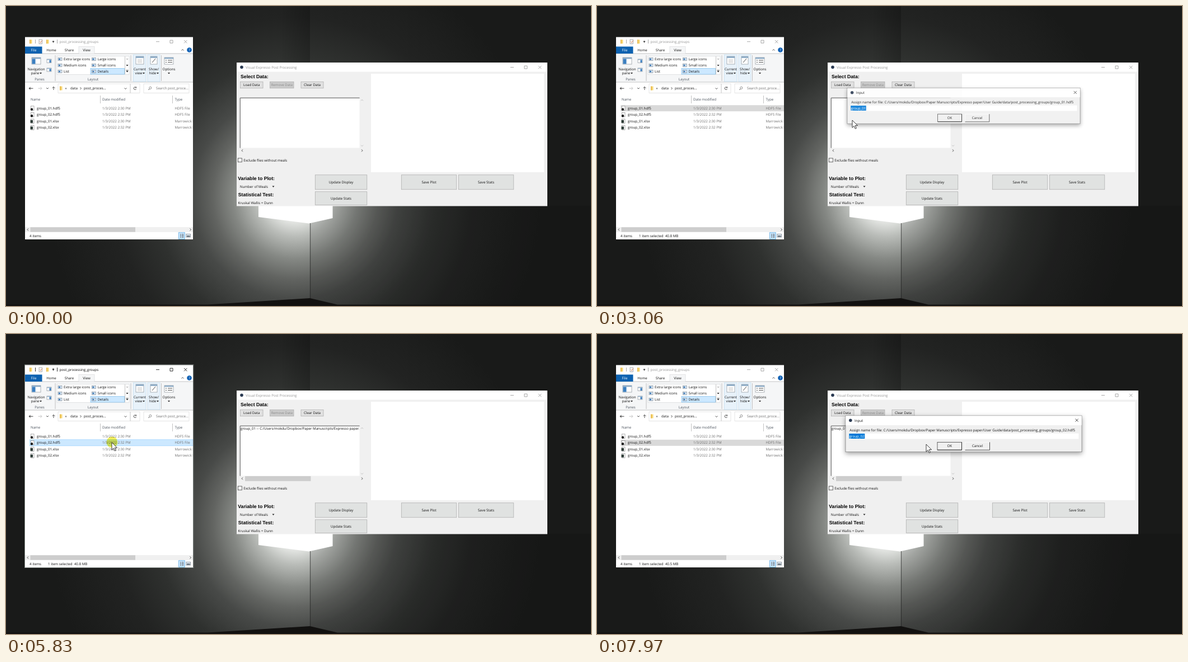
An HTML page that plays this animation: 1045 px wide and 536 px high, repeating every 8000 ms.

```html
<!DOCTYPE html>
<html lang="en">
<head>
<meta charset="utf-8">
<title>Post processing</title>
<style>
  html, body { margin: 0; width: 100%; height: 100%; overflow: hidden; background: #191a19; }
  svg { display: block; width: 100vw; height: 100vh; }
  text { font: 6.2px "Open Sans", "Noto Sans", sans-serif; fill: #111; white-space: pre; text-rendering: geometricPrecision; }
  .mid { text-anchor: middle; }
  .head { font: bold 8.7px "Liberation Sans", Arial, sans-serif; fill: #000; }
  .gray { fill: #6d6d6d; }
  .col { fill: #4a525c; }
  .off { fill: #8a8a8a; }
  .inv { fill: #fff; }
  .ln { fill: none; stroke: #222; stroke-width: .8; }
  .pale { stroke: #b4b4b4; }
  .bar text { fill: #929292; }
  .bar .ln { stroke: #929292; }
  .active > .bar text { fill: #000; }
  .active > .bar .ln { stroke: #000; }
  .edge { opacity: 0; }
  .active > .edge { opacity: 1; }
  #dialog { transform-origin: 655px 178.5px; filter: drop-shadow(0 3px 4px rgba(0,0,0,.38)); }
  .hide { display: none; }
</style>
</head>
<body>
<svg id="stage" viewBox="0 0 1045 536" preserveAspectRatio="none"></svg>
<script>
const T = (x, y, s, c = '') => `<text x="${x}" y="${y}" class="${c}">${s}</text>`;
const R = (x, y, w, h, fill, stroke = 'none') =>
  `<rect x="${x}" y="${y}" width="${w}" height="${h}" fill="${fill}" stroke="${stroke}" stroke-width=".7"/>`;
const P = (d, c = 'ln') => `<path d="${d}" class="${c}"/>`;
const F = (d, fill = '#222') => `<path d="${d}" fill="${fill}"/>`;
const down = (x, y, fill) => F(`M${x - 2} ${y - 1}h4l-2 2.4z`, fill);
const chev = (x, y, dx, dy, c = 'ln') => // small open arrow head
  P(dx ? `M${x - dx} ${y - 2}L${x + dx} ${y}L${x - dx} ${y + 2}` : `M${x - 2} ${y - dy}L${x} ${y + dy}L${x + 2} ${y - dy}`, c);
const folder = (x, y) => R(x - 2, y - 3.5, 4.5, 7, '#f7d877') + R(x - 2, y - 3.5, 1.6, 7, '#e5b548');
const caption = (x, y) => P(`M${x} ${y}h6M${x + 25} ${y - 2.5}h5v5h-5zM${x + 50} ${y - 2.7}l5.4 5.4m0 -5.4l-5.4 5.4`);
const button = (x, y, w, h, s, fill = '#e1e1e1', c = '') =>
  R(x, y, w, h, fill, '#a9a9a9') + T(x + w / 2, y + h / 2 + 2.2, s, 'mid ' + c);

const path = '/Users/mokdu/Dropbox/Paper Manuscripts/Expresso paper/User Guide/data/post_processing_groups/group_0';
const rowTop = i => 177 + i * 11.6;

function room() {
  const stops = [[0, '#fff'], [.1, '#eceeeb'], [.18, '#b9bcb8'], [.28, '#858884'], [.37, '#626461'], [.46, '#484a48'],
    [.62, '#2f312f'], [.8, '#222322'], [1.1, '#191a19']].map(([o, c]) => `<stop offset="${o / 1.1}" stop-color="${c}"/>`).join('');
  return `<radialGradient id="glow" gradientUnits="userSpaceOnUse" cx="517" cy="340" r="440">${stops}</radialGradient>
    <linearGradient id="fold"><stop offset="0" stop-color="#000" stop-opacity="0"/><stop offset="1" stop-color="#000" stop-opacity=".22"/></linearGradient>
    <linearGradient id="ghostFill"><stop offset="0" stop-color="#f4f9fc" stop-opacity=".55"/><stop offset="1" stop-color="#d5eaf5" stop-opacity=".8"/></linearGradient>
    <clipPath id="exClip"><rect x="34" y="55" width="300" height="362"/></clipPath>
    <clipPath id="listClip"><rect x="418.5" y="164" width="212.5" height="89"/></clipPath>` +
    R(0, 0, 1045, 536, 'url(#glow)') + R(490, 0, 53, 101, 'url(#fold)') +
    `<path d="M543 388V523L560 533H1045V357H583V379z" fill="#000" opacity=".13"/>
    <path d="M543.5 388V522" stroke="#1c1d1c" stroke-width="1.3" opacity=".55"/>` +
    F('M0 533.5L360 533.5L543 522L592 533.5L1045 533.5V536H0z', '#121110') +
    F('M451 356H583.500V379L541 388.500L451 377z', '#fff');
}

function ribbon() {
  const small = (x, y, s) => R(x - 10, y - 4.7, 7, 5, '#dce9f5', '#7b8894') + R(x - 9, y - 3.2, 3, 2.5, '#3c78b4') + T(x, y, s);
  const pane = (x, y, w, h) => R(x, y, w, h, '#fff', '#8a9299') + R(x, y, w, h / 5, '#8aa9c4');
  return R(34, 85, 300, 51, '#f5f6f7') + P('M34 136h300M34 85h300', 'ln pale') + R(130, 72.5, 28, 13, '#f5f6f7', '#dadbdc') +
    R(34, 72.5, 30.5, 12.5, '#0d62b0') + T(49.5, 81, 'File', 'mid inv') + T(81, 81, 'Home', 'mid') +
    T(113, 81, 'Share', 'mid') + T(144, 81, 'View', 'mid') + chev(315.5, 78.5, 0, -1, 'ln off') +
    '<circle cx="327.500" cy="78.500" r="4.300" fill="#0e5fb4"/>' + T(327.5, 80.8, '?', 'mid inv') +
    pane(46, 92, 16, 12) + R(46.5, 94.5, 6, 9, '#3b7fc0') + T(54, 115, 'Navigation', 'mid') + T(52, 122, 'pane', 'mid') + down(62, 120) +
    pane(73, 95, 8, 6.5) + R(77.5, 96.5, 3, 4.5, '#3b7fc0') + pane(73, 111, 8, 6) + R(77.5, 112.5, 3, 4, '#3b7fc0') + T(60, 132.5, 'Panes', 'mid col') +
    R(91, 89.5, 129, 33, '#fff', '#d5d7d9') + R(151, 111.5, 60.5, 10.5, '#cce8ff', '#84bfea') + P('M212.500 90v32', 'ln pale') +
    small(103, 97, 'Extra large icons') + small(163.5, 97, 'Large icons') + small(103, 108, 'Medium icons') +
    small(163.5, 108, 'Small icons') + small(103, 119, 'List') + small(163.5, 119, 'Details') +
    down(216.5, 95, '#bbb') + down(216.5, 106) + down(216.5, 117) + P('M214.500 114.800h4') + T(155.5, 132.5, 'Layout', 'mid col') +
    P('M88 88v46M223 88v46M277.500 88v46', 'ln pale') +
    R(227.5, 87, 22.5, 48, '#e8f2fa', '#c0dcf0') + R(253, 87, 22, 48, '#e8f2fa', '#c0dcf0') +
    pane(232, 90, 14, 14) + P('M235 96h8M235 98.500h8M235 101h8', 'ln pale') + pane(258, 90, 12, 14) + P('M261 101l6 -7', 'ln off') +
    T(239, 115, 'Current', 'mid') + T(237, 122, 'view', 'mid') + down(246, 120) +
    T(264, 115, 'Show/', 'mid') + T(262, 122, 'hide', 'mid') + down(271, 120) +
    pane(283, 92, 16, 12) + P('M285 97h2m2 0h8M285 100.500h2m2 0h8', 'ln') + T(291, 115, 'Options', 'mid') + down(291, 120);
}

function explorer() {
  const file = (i, s, t, type) => {
    const y = rowTop(i) + 7.6, excel = i > 1;
    return R(44.5, y - 5.8, 5.5, 7.6, '#fff', '#8c8c8c') +
      (excel ? R(43.5, y - 4, 4.5, 5, '#2c3a35') : `<circle cx="46" cy="${y}" r="2.200" fill="#111"/>`) +
      T(55, y, s) + T(172, y, '1/3/2022 ' + t + ' PM', 'gray') + T(301.5, y, type, 'gray');
  };
  return `<g id="explorer"><rect class="edge" x="33.500" y="55" width="301.300" height="362.500" fill="none" stroke="#7d8480" stroke-width="1"/>
    <g clip-path="url(#exClip)">` + R(34, 55.5, 300, 361.5, '#fff') + ribbon() +
    P('M44.500 147.200h-3m0 0h7M43.700 144.700l-2.500 2.500l2.500 2.500M85 150v-5.500M82.700 146.700l2.300-2.300l2.300 2.300') +
    P('M57.500 147.200h6M61.500 144.700l2.500 2.500l-2.500 2.500', 'ln pale') + chev(74, 147, 0, 1) +
    R(93, 139, 146, 16.5, '#fff', '#d9d9d9') + P('M222 139v16.500', 'ln pale') + folder(98, 147) +
    T(105.5, 149, '«') + T(115, 149.3, 'data') + chev(133.5, 147.2, .9, 0) + T(139, 149.3, 'post_proces...') + chev(213.5, 147.5, 0, 1) +
    P('M232.300 145.700a2.300 2.300 0 1 0 .3 2.300M232.600 144.300v1.700h-1.800') +
    R(246, 139, 81, 16.5, '#fff', '#d9d9d9') + '<circle cx="257.800" cy="146.300" r="2" class="ln off" style="fill:none;stroke:#777"/>' +
    P('M256.300 148l-2 2') + T(268, 149.3, 'Search post_proce...', 'gray') +
    T(44, 168.8, 'Name', 'col') + T(172, 168.8, 'Date modified', 'col') + T(301.5, 168.8, 'Type', 'col') +
    P('M168.500 160v14M297.500 160v14', 'ln pale') +
    '<rect id="hover" x="42" width="292" height="11.400" fill="#e5f3ff"/><rect id="pick" x="42.300" width="293" height="11" stroke-width=".7"/>' +
    file(0, 'group_01.hdf5', '2:30', 'HDF5 File') + file(1, 'group_02.hdf5', '2:32', 'HDF5 File') +
    file(2, 'group_01.xlsx', '2:30', 'Marrowick E') + file(3, 'group_02.xlsx', '2:32', 'Marrowick E') +
    R(34, 395, 300, 9, '#f0f0f0') + R(43.5, 395.3, 187.5, 8.4, '#cdcdcd') + chev(39, 399.5, -1, 0) + chev(329.5, 399.5, 1, 0) +
    T(42, 412.8, '4 items') + '<text id="status" x="75" y="412.800"></text>' +
    R(308.5, 404.8, 11, 11.5, '#cce8ff', '#4aa0de') + P('M311 408h2m1 0h3.500M311 410.500h2m1 0h3.500M311 413h2m1 0h3.500') +
    R(322, 407.5, 7.5, 5.5, '#e6eef5', '#6b7680') + R(323, 410, 5.5, 2.5, '#6b7680') +
    `</g><g class="bar">` + folder(44, 63.7) + P('M52.500 60v7M91.500 60v7', 'ln pale') + R(59, 60, 5.5, 7.5, '#fff', '#8a8a8a') +
    '<path d="M60.300 63.500l1.500 2l3-4" fill="none" stroke="#d06a3a" stroke-width=".8"/>' + folder(74, 63.7) + down(84.5, 64) + P('M83 62h3') +
    T(95.8, 66, 'post_processing_groups') + caption(268, 63.7) + '</g></g>';
}

function app() {
  return '<g id="app">' + R(412, 101, 555, 256.500, '#f0f0f0') + R(412, 101, 555, 16.500, '#fff') +
    '<circle cx="421" cy="109.300" r="2.800" fill="#2a3a52"/><g class="bar">' + T(428, 111.8, 'Visual Expresso Post Processing') + caption(901, 109.5) + '</g>' +
    R(652, 121, 309, 176, '#fff') + T(419, 128.5, 'Select Data:', 'head') +
    button(418.5, 135.3, 40.5, 11.5, 'Load Data') + button(471.5, 135.3, 42.5, 11.5, 'Remove Data', '#cbcbcb', 'off') +
    button(527, 135.3, 40, 11.5, 'Clear Data') +
    R(418, 164, 213.5, 89.5, '#fff') + P('M418.300 253.500V164.300H631.500', 'ln off') + '<path d="M418.300 253.500V164.300H631.500" fill="none" stroke="#8a8a8a" stroke-width=".8"/>' +
    chev(636, 168.300, 0, -1, 'ln pale') + chev(636, 249.5, 0, 1, 'ln pale') +
    `<g id="empty">` + chev(422, 258.3, -1, 0, 'ln off') + chev(636, 258.3, 1, 0, 'ln off') + '</g>' +
    `<g id="filled"><g clip-path="url(#listClip)">` + T(419, 171, 'group_01 -- C:' + path + '1.hdf5') + '</g>' +
    R(427, 254, 117.5, 8.800, '#cdcdcd') + chev(422, 258.3, -1, 0) + chev(636, 258.3, 1, 0) + '</g>' +
    R(414.500, 272, 6.800, 6.800, '#fff', '#222') + T(424.3, 277.8, 'Exclude flies without meals') +
    T(414.3, 310.5, 'Variable to Plot:', 'head') + T(417.8, 324.8, 'Number of Meals') + down(477.500, 322.5) +
    T(414.8, 340.3, 'Statistical Test:', 'head') + T(414.5, 353.6, 'Kruskal Wallis + Dunn') +
    button(552.3, 301.8, 92.5, 26, 'Update Display', '#e0e2e1') + button(552.3, 331.8, 92.5, 23.7, 'Update Stats', '#e0e2e1') +
    button(706.3, 301.8, 98.5, 26, 'Save Plot', '#e0e2e1') + button(808.3, 301.8, 98.5, 26, 'Save Stats', '#e0e2e1') + '</g>';
}

function dialog() {
  const raised = (x, w, s) => R(x, 193.3, w, 13.8, '#f0f0f0', '#fff') +
    P(`M${x} 207.300h${w}v-14`) + T(x + w / 2, 202.3, s, 'mid');
  return '<g id="dialog">' + R(444, 146, 422, 64.700, '#f0f0f0', '#777') + R(444.300, 146.300, 421.400, 16.500, '#fff') +
    '<circle cx="452.800" cy="154.300" r="2.800" fill="#2a3a52"/>' + T(460, 156.6, 'Input') + P('M854.500 151.500l5.200 5.200m0 -5.200l-5.200 5.200') +
    '<text id="ask" x="451.300" y="173.700"></text>' + R(449.800, 177.500, 410.500, 10, '#fff') + R(450.300, 178, 28, 9, '#0078d7') +
    '<text id="entry" x="450.700" y="184.700" class="inv"></text>' + raised(608, 43.500, 'OK') + R(608, 193.300, 43.500, 13.800, 'none', '#222') +
    raised(657.5, 44, 'Cancel') + '<path id="sunk" d="M608.500 207V193.800H651.500M610.300 205.500V195.300H650V205.500z" fill="none" stroke="#333" stroke-width=".9"/></g>';
}

const pointer = `<g id="ghost"><rect x="-54.500" y="-52.500" width="86.500" height="85.500" fill="#000" opacity=".1"/>
  <rect x="-55" y="-53" width="86" height="84.500" fill="url(#ghostFill)"/><path d="M-55 31.500H31V-53" fill="none" stroke="#9fb4c0" stroke-width=".8"/></g>
  <g id="cursor"><circle id="press" cx=".4" cy="-.4" r="10" fill="#f2ea1c" opacity=".72" style="mix-blend-mode:multiply"/>
  <path d="M0 0v13.300l3.100-2.900 2.200 4.900 2.100-.9-2.200-4.800h4.300z" fill="#fff" stroke="#111" stroke-width=".8"/></g>`;

document.getElementById('stage').innerHTML = room() + explorer() + app() + dialog() + pointer;

const el = id => document.getElementById(id);
const show = (id, on) => el(id).classList.toggle('hide', !on);
const within = (n, a, b) => n >= a && n <= b;

// Piecewise linear lookup over rows of [key, ...values]
function lerp(rows, k, col) {
  let i = 1;
  while (i < rows.length - 1 && k > rows[i][0]) i++;
  const [a, b] = [rows[i - 1], rows[i]];
  const u = Math.min(1, Math.max(0, (k - a[0]) / (b[0] - a[0])));
  return a[col] + (b[col] - a[col]) * u;
}

// Screen capture clock: [ms, step]
const clock = [[510, 1], [1560, 9], [1840, 11], [2240, 14], [2900, 19], [3060, 20], [4490, 31], [4630, 32], [5280, 37],
  [5430, 38], [6620, 47], [7040, 50], [7440, 53], [7970, 57]];
// Pointer tip: [step, x, y]
const tip = [[1, 150, 420], [3, 132, 330], [5, 100, 222], [7, 79, 183], [8, 81, 183.5], [9, 80.5, 183], [11, 91, 184], [14, 91, 184],
  [15, 115, 186], [16, 195, 195], [17, 300, 202], [18, 405, 204], [19, 451, 204], [20, 456, 204], [22, 515, 206], [24, 610, 211], [26, 655, 214],
  [29, 633, 200.500], [32, 633, 200.500], [33, 590, 203], [35, 330, 206], [37, 174, 200], [39, 183, 194], [42, 192, 193.500], [43, 194, 193.500],
  [45, 212, 199], [47, 233, 205], [48, 335, 206], [49, 440, 204], [53, 449, 204], [54, 468, 204], [57, 588, 197]];

function draw(t) {
  const n = t < 510 ? 0 : Math.floor(lerp(clock, t, 1) + .03);
  const x = lerp(tip, n, 1), y = lerp(tip, n, 2);
  const second = n >= 41, fading = n === 20 || n === 53;
  const live = within(n, 14, 18) || within(n, 41, 49);
  const pressed = within(n, 9, 18) || n === 31 || within(n, 41, 48);
  const asking = within(n, 20, 31) || n >= 53;

  el('explorer').classList.toggle('active', live);
  el('app').classList.toggle('active', n === 19 || within(n, 32, 39) || within(n, 49, 52));
  el('cursor').setAttribute('transform', `translate(${x} ${y})`);
  el('ghost').setAttribute('transform', `translate(${x} ${y})`);
  show('cursor', n > 0);
  show('press', pressed);
  show('ghost', within(n, 15, 18) || within(n, 44, 48));

  const row = Math.floor((y - 176.500) / 11.6);
  show('hover', n > 0 && !pressed && within(x, 42, 333) && within(row, 0, 3));
  el('hover').setAttribute('y', rowTop(row));
  const blue = live || within(n, 9, 13);
  show('pick', n >= 9);
  el('pick').setAttribute('y', rowTop(second ? 1 : 0) + .2);
  el('pick').setAttribute('fill', blue ? '#cce8ff' : '#d9d9d9');
  el('pick').setAttribute('stroke', blue ? '#99d1ff' : 'none');
  el('status').textContent = n < 9 ? '' : `1 item selected  ${n < 43 ? '40.8' : '40.5'} MB`;

  show('empty', n < 32);
  show('filled', n >= 32);
  show('dialog', asking);
  show('sunk', n === 31);
  el('dialog').style.transform = fading ? 'scale(.986)' : 'none';
  el('dialog').style.opacity = fading ? .87 : 1;
  const id = second ? 2 : 1;
  el('ask').textContent = `Assign name for file: C:${path}${id}.hdf5`;
  el('entry').textContent = 'group_0' + id;
}

const start = performance.now();
function tick() {
  draw((performance.now() - start) % 8000);
  requestAnimationFrame(tick);
}
tick();
</script>
</body>
</html>
```
